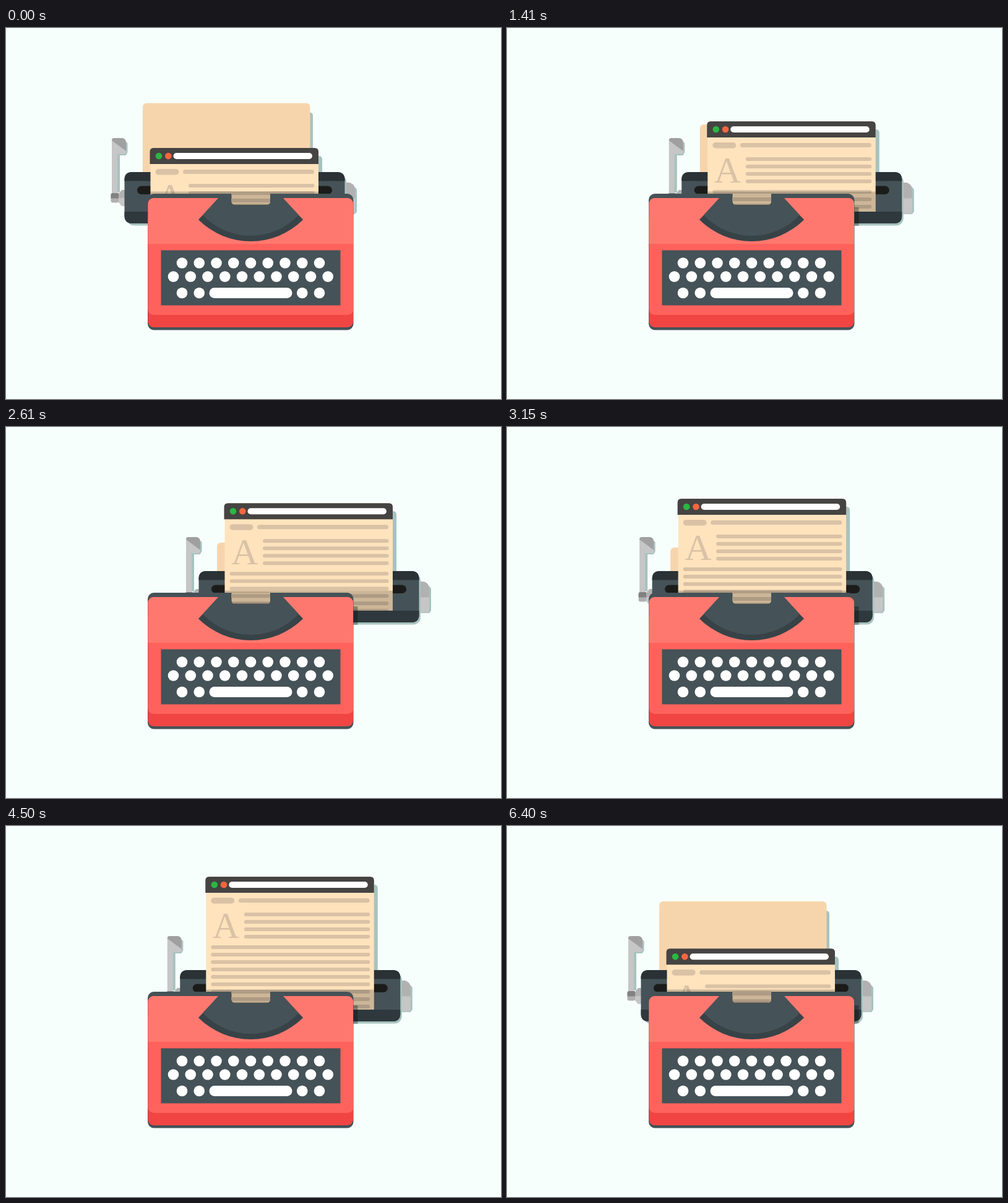
An HTML page that plays this animation: 800x600 px, repeating every 6.43 s.

```html
<!DOCTYPE html>
<html lang="en">
<head>
<meta charset="utf-8">
<title>Typewriter</title>
<style>
  html, body { margin: 0; width: 100%; height: 100%; overflow: hidden; background: #f7fffd; }
  svg { display: block; width: 800px; height: 600px; }
  .shade { fill: #a7c3be; }
  .slate { fill: #455257; }
  .light { fill: #c6c6c6; }
  .ink { fill: #d9c2a5; }
  .initial { font: 60px "Liberation Serif", "Times New Roman", serif; text-anchor: middle; }
</style>
</head>
<body>
<svg viewBox="0 0 800 600">
  <defs>
    <clipPath id="aboveRoller"><rect y="-700" x="-200" width="1200" height="997"/></clipPath>
    <clipPath id="carriageClip"><rect x="216.5" y="233" width="358" height="87" rx="12"/></clipPath>
    <clipPath id="notchClip"><path d="M364.5 267.500H427V280q0 6-6 6H370.500q-6 0-6-6Z"/></clipPath>
    <clipPath id="redClip"><rect x="229.500" y="275" width="331.500" height="209" rx="9"/></clipPath>
  </defs>

  <g class="slide">
    <g clip-path="url(#aboveRoller)">
      <rect id="backShade" class="shade" x="252" width="269" height="175" rx="5"/>
      <rect id="frontShade" class="shade" x="268" width="268" height="382" rx="5"/>
      <rect id="back" x="246" width="270.500" height="180" rx="6" fill="#f7d5ac"/>
    </g>

    <!-- return lever -->
    <path class="shade" d="M199 182H216l5.500 4V201l-3 5H209V266H199Z"/>
    <path class="light" d="M196 182q0-4 4-4H213q6 1 6 8V200q0 4-4 4H205V268H196Z"/>
    <path fill="#a0a0a0" d="M196 182q0-4 4-4H213q6 1 6 8V199Z"/>
    <path class="light" d="M206 270L212 262H218V288H212L206 281Z"/>
    <path fill="#b2b2b2" d="M206 270L212 262H218V275H206Z"/>
    <rect x="194.500" y="267" width="12.500" height="15.500" rx="3" fill="#b0b0b0"/>
    <path fill="#828282" d="M194.500 275.500V270q0-3 3-3H207V275.500Z"/>

    <!-- roller knob -->
    <path class="shade" d="M574 253H585L592 261V297l-3 4H574Z"/>
    <path class="light" d="M570 250H579q10 2 10 12V296q0 4-4 4H570Z"/>
    <path fill="#b1b1b1" d="M570 250H579q10 2 10 12V275.500H570Z"/>

    <!-- carriage -->
    <rect class="shade" x="220" y="237" width="355" height="82.500" rx="12"/>
    <rect class="slate" x="216.500" y="233" width="356" height="83" rx="12"/>
    <path fill="#2a3236" d="M216.500 247.500V245q0-12 12-12H560.500q12 0 12 12V247.500Z"/>
    <path fill="#2f393d" d="M216.500 297H572.500V304q0 12-12 12H228.500q-12 0-12-12Z"/>
    <path d="M259.500 233V247M530 233V247" stroke="#22292c"/>
    <rect x="237" y="255.500" width="315" height="13.500" rx="6.750" fill="#1b1c1a"/>

    <g clip-path="url(#aboveRoller)">
      <g id="sheet">
        <rect x="258.500" width="271.500" height="386" y="0" rx="6" fill="#ffe3bd"/>
        <path fill="#454443" d="M257.500 26V6q0-6 6-6H524q6 0 6 6V26Z"/>
        <circle cx="272" cy="13" r="5.300" fill="#2cb742"/>
        <circle cx="287.300" cy="13" r="5.300" fill="#f5663f"/>
        <rect x="295.500" y="8" width="224.500" height="10" rx="5" fill="#fff"/>
        <g id="words" class="ink">
          <rect x="266.500" y="34" width="38" height="9.500" rx="4.750"/>
          <rect x="311" y="35" width="212" height="7" rx="3.500"/>
          <text class="initial" x="290.700" y="99">A</text>
        </g>
      </g>
      <rect id="fold" x="258.500" width="271.500" opacity=".2"/>
    </g>
    <g clip-path="url(#carriageClip)">
      <rect id="cast" y="290" width="7.500" height="30" opacity=".3"/>
    </g>
  </g>

  <!-- body -->
  <rect class="slate" x="229" y="268" width="332.500" height="220.500" rx="10"/>
  <g clip-path="url(#redClip)">
    <rect x="229" y="275" width="333" height="210" fill="#f04543"/>
    <rect x="229" y="300" width="333" height="164" rx="10" fill="#ff625c"/>
    <rect x="229" y="275" width="333" height="74" fill="#ff786f"/>
  </g>
  <path fill="#374347" d="M344 275L311 310A119.500 119.500 0 0 0 480 310L447 275Z"/>
  <path class="slate" d="M344 274L318 302.500A106.500 106.500 0 0 0 473 302.500L447 274Z"/>
  <g clip-path="url(#notchClip)">
    <rect x="364" y="267" width="64" height="20" fill="#1b1c1a"/>
    <rect x="364" y="278" width="64" height="9" fill="#454443"/>
    <g class="slide"><use href="#sheet"/></g>
    <rect x="364" y="267" width="64" height="20" opacity=".2"/>
    <rect x="364" y="284.500" width="64" height="2" opacity=".2"/>
  </g>

  <rect class="slate" x="250.500" y="359.500" width="290" height="89"/>
  <g id="keys" fill="#fff">
    <rect x="328.500" y="420" width="134" height="17" rx="8.500"/>
  </g>
</svg>

<script>
const LOOP = 6430, STEP = 30;
const $ = id => document.getElementById(id);

function add(parent, tag, attrs) {
  const el = document.createElementNS("http://www.w3.org/2000/svg", tag);
  set(el, attrs);
  parent.append(el);
}
function set(el, attrs) {
  for (const name in attrs) el.setAttribute(name, attrs[name]);
}

function key(x, y) { add($("keys"), "circle", { cx: x, cy: y, r: 8.8 }); }
for (let i = 0; i < 9; i++) key(284.5 + 27.75 * i, 380);
for (let i = 0; i < 10; i++) key(270.5 + 27.75 * i, 402);
for (const i of [0, 1, 7, 8]) key(284.5 + 27.75 * i, 428.5);

function line(x, y) {
  add($("words"), "rect", { x, y: y - 3, width: 523.5 - x, height: 6, rx: 3 });
}
for (let i = 0; i < 4; i++) line(320, 61 + 12 * i);
for (let i = 0; i < 22; i++) line(266.5, 114 + 12 * i);

const linear = p => p;
const smooth = p => p * p * (3 - 2 * p);
const out = p => 1 - (1 - p) * (1 - p);

// Rows: time, value, easing towards that value
const carriage = [
  [450, -25], [880, -95], [1070, 95, smooth], [1257, 95], [2250, -95],
  [2420, 95, smooth], [2703, 95], [3808, -95], [4000, 95, smooth],
  [4290, 95], [4950, 0]
];
const feeds = [[1100, 1260], [2440, 2680], [4010, 4270]];
const feedTrack = (start, rows) => [
  [450, start], [600, rows[0], out],
  ...feeds.flatMap(([a, b], i) => [[a, rows[i]], [b, rows[i + 1], smooth]])
];
const frontFeed = feedTrack(194, [186, 151, 116, 82]);
const backFeed = feedTrack(121.5, [117, 156, 195, 234]);
const frontEntry = [[6240, 300], [6460, 190, out]];
const backEntry = [[5880, -200], [6290, 124, smooth], [6400, 122]];

function at(track, t) {
  const i = track.findIndex(row => row[0] > t);
  if (i < 0) return track[track.length - 1][1];
  if (i === 0) return track[0][1];
  const [t0, v0] = track[i - 1], [t1, v1, ease = linear] = track[i];
  return v0 + (v1 - v0) * ease((t - t0) / (t1 - t0));
}

// The first pose and the finished page are held; the rest moves in steps.
function stepTime(t) {
  if (t < 480) return 450;
  const from = t < 5410 ? 480 : 5410;
  const stepped = from + Math.floor((t - from) / STEP) * STEP;
  return from === 480 ? Math.min(stepped, 4950) : stepped;
}

function draw(now) {
  const t = stepTime(now % LOOP);
  const dx = at(carriage, t);
  let front, back;
  if (t < 5870) {
    const lift = 321 * (Math.max(0, t - 5410) / 270) ** 2;
    front = at(frontFeed, t) - lift;
    back = at(backFeed, t) - lift;
  } else {
    front = at(frontEntry, t);
    back = at(backEntry, t);
  }
  for (const el of document.querySelectorAll(".slide")) {
    set(el, { transform: `translate(${dx} 0)` });
  }
  set($("sheet"), { transform: `translate(0 ${front})` });
  set($("frontShade"), { y: front + 13 });
  set($("back"), { y: back });
  set($("backShade"), { y: back + 15 });
  const top = Math.max(264.5, front);
  set($("fold"), { y: top, height: Math.max(0, Math.min(297, front + 386) - top) });
  set($("cast"), { x: 561 - dx });
}

function tick() {
  draw(performance.now());
  requestAnimationFrame(tick);
}
tick();
</script>
</body>
</html>
```
